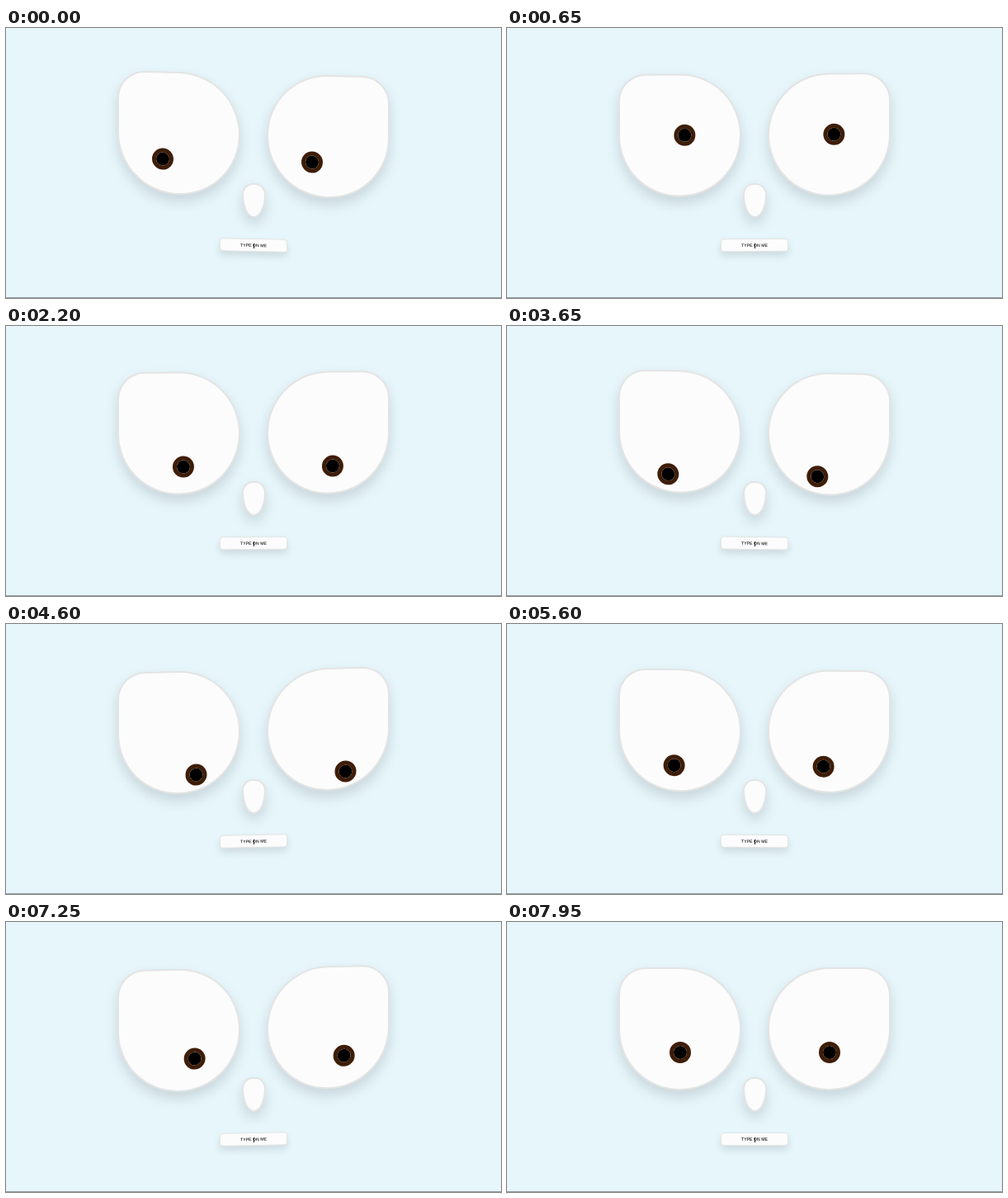
An HTML page that plays this animation: 600 px wide and 327 px high, repeating every 8000 ms.

```html
<!DOCTYPE html>
<html lang="en">
<head>
<meta charset="utf-8">
<title>Watching face</title>
<style>
  html, body { margin: 0; width: 100%; height: 100%; overflow: hidden; background: #e6f6fb; }
  .stage { position: relative; width: 600px; height: 327px; overflow: hidden; }
  .stage div { position: absolute; box-sizing: border-box; }
  .eyes { left: 0; top: 0; width: 600px; height: 258px; }
  .skin {
    background: #fcfcfc;
    border: 2px solid #e4e4e4;
    box-shadow: 0 8px 16px rgba(0, 0, 0, .13);
  }
  .eye { top: 54.5px; width: 148.5px; height: 149px; }
  .eye.left { left: 135px; border-radius: 33px 50% 50% 50%; }
  .eye.right { left: 316px; border-radius: 50% 33px 50% 50%; }
  .pupil {
    left: -13px; top: -13px; width: 26px; height: 26px;
    border-radius: 50%; border: 5px solid #3e1d08; background: #000 padding-box;
  }
  .nose {
    left: 285.5px; top: 188px; width: 29px; height: 42px;
    border-radius: 45% 45% 50% 50% / 33% 33% 67% 67%;
  }
  .mouth {
    left: 259px; top: 255px; width: 82px; height: 16px;
    border-width: 1px; border-radius: 4px;
    box-shadow: 0 5px 10px rgba(0, 0, 0, .11);
    font: bold 5.2px/14px "Liberation Sans", Arial, sans-serif;
    color: #444; text-align: center; white-space: nowrap;
  }
  .caret { left: 39.5px; top: 4.5px; width: 1px; height: 6px; background: #222; }
  .rule { left: 0; top: 326px; width: 600px; height: 1px; background: #959b9e; }
</style>
</head>
<body>
<div class="stage">
  <div class="eyes">
    <div class="eye left skin"></div>
    <div class="eye right skin"></div>
    <div class="pupil"></div>
    <div class="pupil"></div>
  </div>
  <div class="nose skin"></div>
  <div class="mouth skin">TYPE ON ME<div class="caret"></div></div>
  <div class="rule"></div>
</div>
<script>
  const DURATION = 8000;
  const EYE_DISTANCE = 181;
  const REST_X = 210;
  const TILT_PER_PIXEL = 0.0635;

  // The gaze glides to each point in turn and rests between glides.
  const START = { x: 190, y: 161 };
  const glides = [
    { from: 0, to: 350, x: 209, y: 133 },
    { from: 450, to: 700, x: 216, y: 129 },
    { from: 950, to: 1800, x: 195, y: 164 },
    { from: 1800, to: 2550, x: 231, y: 175 },
    { from: 2900, to: 3180, x: 186, y: 181 },
    { from: 3200, to: 4700, x: 231, y: 181 },
    { from: 4900, to: 6080, x: 187, y: 167 },
    { from: 6080, to: 7400, x: 230, y: 164 },
    { from: 7400, to: 7950, x: 210, y: 158 }
  ];

  const clamp = value => Math.min(1, Math.max(0, value));
  const ease = p => (1 - Math.cos(Math.PI * p)) / 2;

  function gazeAt(time) {
    let { x, y } = START;
    for (const glide of glides) {
      const p = ease(clamp((time - glide.from) / (glide.to - glide.from)));
      x += (glide.x - x) * p;
      y += (glide.y - y) * p;
    }
    return { x, y };
  }

  const [eyes, mouth, caret] = ['.eyes', '.mouth', '.caret'].map(s => document.querySelector(s));
  const pupils = document.querySelectorAll('.pupil');

  function draw(now) {
    const time = now % DURATION;
    const { x, y } = gazeAt(time);
    const tilt = `skewY(${(REST_X - x) * TILT_PER_PIXEL}deg)`;
    eyes.style.transform = tilt;
    mouth.style.transform = tilt;
    pupils.forEach((pupil, i) => {
      pupil.style.transform = `translate(${x + i * EYE_DISTANCE}px, ${y}px)`;
    });
    caret.style.opacity = time >= 2700 && time < 2950 ? 0 : 1;
    requestAnimationFrame(draw);
  }

  draw(performance.now());
</script>
</body>
</html>
```
